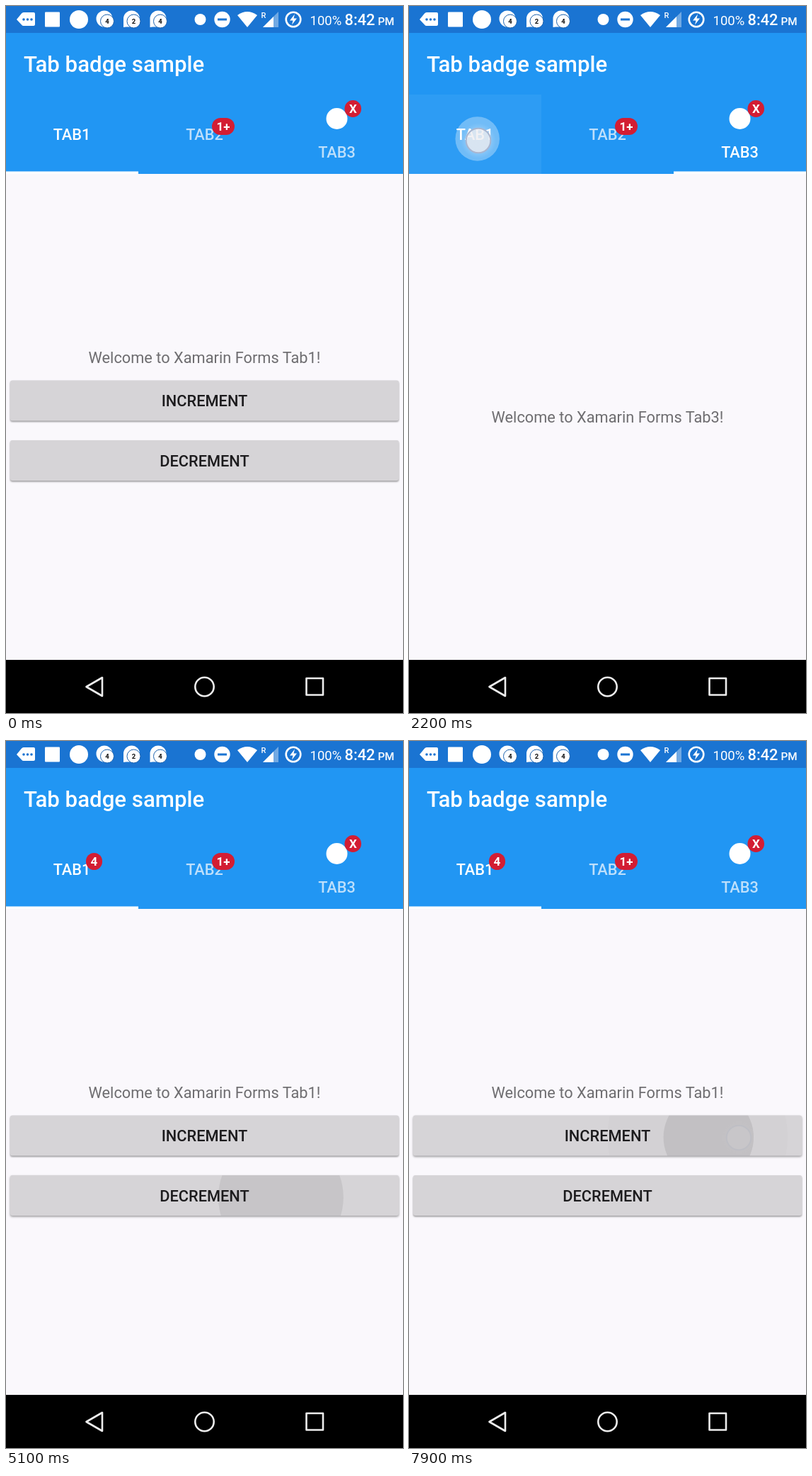
Recreate the animation shown at these times as an HTML page. Size 561x998 px, loop 8000 ms.

```html
<!DOCTYPE html>
<html lang="en">
<head>
<meta charset="utf-8">
<title>Tab badge sample</title>
<style>
  html, body { margin: 0; width: 100%; height: 100%; overflow: hidden; background: #faf8fc; }
  svg { display: block; width: 100vw; height: 100vh; }
  text { font-family: Roboto, sans-serif; font-size: 21.8px; }
  .medium { font-weight: 500; }
  .bold { font-weight: 700; }
  .mid { text-anchor: middle; }
  .white { fill: #fff; }
  .badge rect { fill: #d31d33; }
  .badge text { font-size: 17px; font-weight: 700; fill: #fff; text-anchor: middle; }
  .count circle { fill: #fff; stroke: #1b62ae; stroke-width: 1; }
  .count text { font-size: 9.5px; font-weight: 700; text-anchor: middle; fill: #111; }
  .button { fill: #d6d4d7; }
  .welcome { fill: #6e6d70; }
  .caption { fill: #1c1b1d; }
</style>
</head>
<body>
<svg viewBox="0 0 561 998" preserveAspectRatio="none">
  <defs>
    <clipPath id="clip-tab0"><rect y="125" width="187" height="112"/></clipPath>
    <clipPath id="clip-tab1"><rect x="187" y="125" width="187" height="112"/></clipPath>
    <clipPath id="clip-tab2"><rect x="374" y="125" width="187" height="112"/></clipPath>
    <clipPath id="clip-inc"><rect x="6" y="528.5" width="549" height="57" rx="3"/></clipPath>
    <clipPath id="clip-dec"><rect x="6" y="613" width="549" height="57" rx="3"/></clipPath>
    <radialGradient id="halo">
      <stop offset=".7" stop-color="#fff" stop-opacity=".45"/>
      <stop offset="1" stop-color="#fff" stop-opacity="0"/>
    </radialGradient>
  </defs>

  <rect width="561" height="998" fill="#faf8fc"/>
  <rect width="561" height="237" fill="#2196f3"/>
  <rect width="561" height="38" fill="#1a74d2"/>

  <!-- status bar -->
  <g class="white">
    <path d="M15 19 22 10.5Q23 9 25 9H39Q41 9 41 11V26Q41 28 39 28H25Q23 28 22 26.500Z"/>
    <g fill="#1a74d2"><circle cx="25" cy="19" r="1.8"/><circle cx="30.500" cy="19" r="1.8"/><circle cx="36" cy="19" r="1.8"/></g>
    <rect x="55" y="8.500" width="21" height="21" rx="1"/>
    <circle cx="103" cy="19" r="13"/>
    <circle cx="139" cy="18" r="11.5"/>
    <path id="bubble" d="M166 30V18A11.500 11.500 0 1 1 177.500 29.500H170Z"/>
    <use href="#bubble" x="37.500"/>
    <circle cx="274.500" cy="19" r="8"/>
    <circle cx="305.500" cy="19" r="11.2"/>
    <rect x="299" y="17.500" width="13" height="3" fill="#1a74d2"/>
    <path d="M327 13Q341 3 355 13L341 30Z"/>
    <path d="M385 8V30H363Z" opacity=".38"/>
    <path d="M378 15V30H363Z"/>
    <text class="medium" x="360.500" y="17" style="font-size:11px">R</text>
    <circle cx="406" cy="19" r="10.300" fill="none" stroke="#fff" stroke-width="2.600"/>
    <path d="M408 11.500 401 20.500H405.500L404 26.500 411 17.500H406.500Z"/>
    <text x="429.500" y="26.500" style="font-size:18.500px">100%</text>
    <text class="medium" x="478.500" y="27">8:42</text>
    <text class="medium" x="525.500" y="27" style="font-size:15.300px">PM</text>
  </g>
  <g class="count">
    <circle cx="143" cy="21.500" r="9.500"/><text x="143" y="25">4</text>
    <circle cx="180.500" cy="21.500" r="9.500"/><text x="180.500" y="25">2</text>
    <circle cx="218" cy="21.500" r="9.500"/><text x="218" y="25">4</text>
  </g>

  <text class="white medium" x="25" y="93" style="font-size:31.200px">Tab badge sample</text>

  <!-- pages -->
  <g id="home">
    <rect id="shade-inc" x="6" y="530" width="549" height="57" rx="3"/>
    <rect id="shade-dec" x="6" y="614.500" width="549" height="57" rx="3"/>
    <rect class="button" x="6" y="528.500" width="549" height="57" rx="3"/>
    <rect class="button" x="6" y="613" width="549" height="57" rx="3"/>
  </g>
  <text id="welcome" class="welcome mid" x="280.500"></text>

  <g id="ripples"></g>

  <g id="captions">
    <text class="caption medium mid" x="280.500" y="565">INCREMENT</text>
    <text class="caption medium mid" x="280.500" y="649.500">DECREMENT</text>
  </g>

  <!-- tabs -->
  <g class="white medium mid">
    <text x="93" y="189">TAB1</text>
    <text id="label1" x="280.500" y="189">TAB2</text>
    <text id="label2" x="467.500" y="214">TAB3</text>
    <circle cx="467.500" cy="159" r="15"/>
  </g>
  <rect id="indicator" class="white" y="233.500" width="187" height="3.500"/>
  <g id="badge" class="badge"><rect x="113" y="158" width="23" height="24" rx="11.500"/><text id="count" x="124.500" y="176"></text></g>
  <g class="badge"><rect x="291" y="158" width="32" height="24" rx="12"/><text x="307" y="176">1+</text></g>
  <g class="badge"><rect x="478.500" y="133" width="23.500" height="24" rx="11.700"/><text x="490.300" y="151">X</text></g>

  <g id="touches"></g>

  <!-- navigation bar -->
  <rect y="923" width="561" height="75"/>
  <g fill="none" stroke="#ededed" stroke-width="2.600" stroke-linejoin="round">
    <path d="M113.500 961 136 948V974Z"/>
    <circle cx="280.500" cy="961" r="13.200"/>
    <rect x="424.500" y="949" width="23.500" height="23.500"/>
  </g>
</svg>
<script>
const LOOP = 8000, STEP = 100;
const $ = id => document.getElementById(id);

// centre, full ripple radius, growth time constant, tint
const tab = i => ({ cx: 93.5 + 187 * i, cy: 181, reach: 109, tau: 148, color: '#fff', alpha: 0.36 });
const button = cy => ({ cx: 280.5, cy, reach: 277, tau: 650, color: '#000', alpha: 0.16 });
const targets = { tab0: tab(0), tab1: tab(1), tab2: tab(2), inc: button(557), dec: button(641.5) };

// down, up, target, touch x, touch y, ripple start x
const taps = [
  [480, 640, 'tab1', 284, 175],
  [1270, 1350, 'tab2', 517, 205],
  [2150, 2280, 'tab0', 98, 190],
  [2750, 2850, 'inc', 437, 560],
  [3280, 3480, 'inc', 437, 562, 447],
  [3580, 3700, 'inc', 437, 562],
  [3960, 4060, 'inc', 437, 562],
  [4850, 5000, 'dec', 439, 645],
  [5280, 5400, 'dec', 436, 650],
  [5600, 5850, 'dec', 434, 653, 474],
  [5970, 6030, 'dec', 434, 653],
  [6950, 7050, 'inc', 464, 560],
  [7420, 7470, 'inc', 466, 560],
  [7500, 7690, 'inc', 466, 560, 516],
  [7730, 7815, 'inc', 466, 560],
];
const pages = [[0, 0], [650, 1], [1350, 2], [2300, 0]];
const counts = [[0, 0], [2900, 1], [3500, 2], [3780, 3], [4180, 4],
  [5150, 3], [5450, 2], [5880, 1], [6150, 0],
  [7100, 1], [7500, 2], [7700, 3], [7880, 4]];

const clamp = v => Math.min(1, Math.max(0, v));
const lerp = (a, b, p) => a + (b - a) * p;
const indexAt = (table, t) => table.findLastIndex(row => row[0] <= t);

function add(parent, name, attrs) {
  const el = document.createElementNS('http://www.w3.org/2000/svg', name);
  for (const key in attrs) el.setAttribute(key, attrs[key]);
  return parent.appendChild(el);
}

const pointers = taps.map(([down, up, name, x, y, startX = x]) => {
  const target = targets[name];
  const ripple = add($('ripples'), 'g', { 'clip-path': `url(#clip-${name})`, fill: target.color });
  if (name.startsWith('tab'))
    add(ripple, 'rect', { x: target.cx - 93.5, y: 125, width: 187, height: 112, opacity: 0.15 });
  const disc = add(ripple, 'circle', {});
  const touch = add($('touches'), 'g', { transform: `translate(${x} ${y})` });
  add(touch, 'circle', { r: 25, fill: 'url(#halo)', opacity: 0.35 });
  add(touch, 'circle', { r: 17.3, fill: '#efedf0', 'fill-opacity': 0.78, stroke: '#a9b6d0', 'stroke-width': 2 });
  return { down, up, name, y, startX, target, ripple, disc, touch };
});

function drawPointer(p, t) {
  const shown = t >= p.down;
  const fade = clamp(1 - (t - p.up) / 300) ** 2;
  const grow = 1 - Math.exp(-Math.max(0, t - p.down) / p.target.tau);
  p.disc.setAttribute('cx', lerp(p.startX, p.target.cx, grow));
  p.disc.setAttribute('cy', lerp(p.y, p.target.cy, grow));
  p.disc.setAttribute('r', p.target.reach * grow);
  p.ripple.setAttribute('opacity', shown ? p.target.alpha * fade : 0);
  p.touch.setAttribute('opacity', shown ? clamp(1 - (t - p.up) / 100) : 0);
}

function drawShade(name, t) {
  const lift = Math.max(...pointers.filter(p => p.name === name && t >= p.down)
    .map(p => clamp((t - p.down) / 150) * clamp(1 - (t - p.up) / 120)), 0);
  $('shade-' + name).style.filter = `blur(${1.3 + lift}px)`;
  $('shade-' + name).setAttribute('fill', `rgba(0,0,0,${0.4 - 0.05 * lift})`);
}

function draw(now) {
  const t = Math.floor(now % LOOP / STEP) * STEP;

  const i = indexAt(pages, t);
  const [since, page] = pages[i];
  const from = i ? pages[i - 1][1] : page;
  const slide = 1 - (1 - clamp((t - since) / 300)) ** 2.15;
  $('indicator').setAttribute('x', lerp(from, page, slide) * 187);
  $('label1').setAttribute('opacity', page === 1 ? 1 : 0.7);
  $('label2').setAttribute('opacity', page === 2 ? 1 : 0.7);
  $('home').style.display = $('captions').style.display = page ? 'none' : '';
  $('welcome').textContent = `Welcome to Xamarin Forms Tab${page + 1}!`;
  $('welcome').setAttribute('y', page ? 588 : 504);

  const count = counts[indexAt(counts, t)][1];
  $('badge').style.display = count ? '' : 'none';
  $('count').textContent = count;

  pointers.forEach(p => drawPointer(p, t));
  drawShade('inc', t);
  drawShade('dec', t);
}

const start = performance.now();
function tick() {
  draw(performance.now() - start);
  requestAnimationFrame(tick);
}
tick();
</script>
</body>
</html>
```
